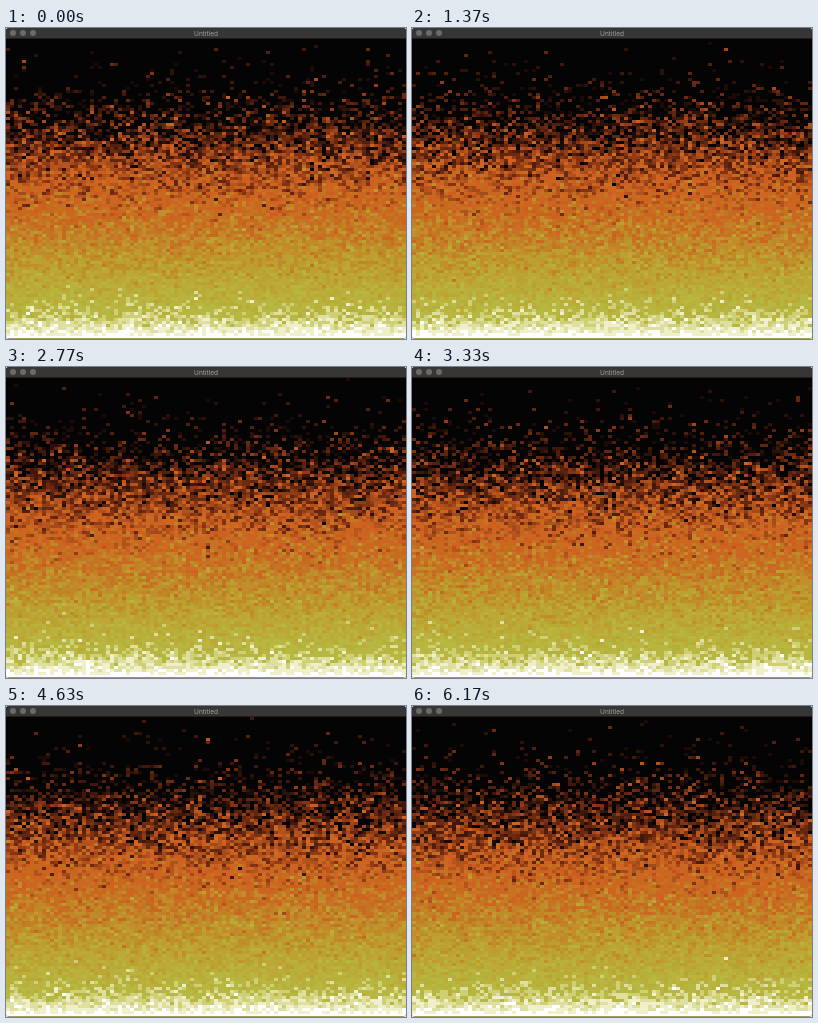
Write an HTML page with a canvas that moves like this. It is 400 px wide and 311 px high and loops after 7170 ms.

```html
<!DOCTYPE html>
<html lang="en">
<head>
<meta charset="utf-8">
<title>Untitled</title>
<style>
  html, body { margin: 0; width: 100%; height: 100%; overflow: hidden; background: #fff; }
  .window { position: relative; width: 400px; height: 311px; overflow: hidden; border-radius: 3px; background: #050404; }
  .bar { position: absolute; inset: 0 0 auto; height: 10px; background: #363636; border-bottom: 1px solid #2c1814;
         color: #a2a2a2; font: 6.5px/13px Inter, Roboto, sans-serif; text-align: center; }
  .bar i { position: absolute; top: 2px; width: 6px; height: 6px; border-radius: 50%; background: #6a6a68; }
  canvas { position: absolute; left: 0; top: 11px; width: 400px; height: 300px; image-rendering: pixelated; }
  .edge { position: absolute; left: 2px; right: 2px; bottom: 0; height: 1px; background: #a39a5c; }
</style>
</head>
<body>
<div class="window">
  <div class="bar"><i style="left:4px"></i><i style="left:14px"></i><i style="left:24px"></i>Untitled</div>
  <canvas width="100" height="100"></canvas>
  <div class="edge"></div>
</div>
<script>
const SIZE = 100, LOOP = 7170, LAST = 6170, STEP = 100 / 3, STEPS = 186, COOLING = 0.48;

const toLinear = v => (v / 255) ** 2.2;
const toByte = v => Math.round(255 * v ** (1 / 2.2));

// Classic fire colours, muted as on a wide-gamut screen.
const palette = (
  '050404 1f0707 2f0f07 470f07 571707 671f07 771f07 8f2707 9f2f07 af3f07 bf4707 c74707 ' +
  'df4f07 df5707 df5707 d75f07 d75f07 d7670f cf6f0f cf770f cf7f0f cf8717 c78717 c78f17 ' +
  'c7971f bf9f1f bf9f1f bfa727 bfa727 bfaf2f b7af2f b7b72f b7b737 cfcf6f dfdf9f efefc7 ffffff'
).split(' ').map(hex => {
  const n = parseInt(hex, 16);
  const [r, g, b] = [n >> 16, n >> 8 & 255, n & 255].map(toLinear);
  const red = toByte(0.82 * r + 0.18 * g);
  const green = toByte(0.05 * r + 0.95 * g);
  const blue = toByte(0.01 * r + 0.03 * g + 0.96 * b);
  return (255 << 24 | blue << 16 | green << 8 | red) >>> 0;
});
const HOT = palette.length - 1;

let seed = 20771;
function random() {
  seed = seed + 0x6D2B79F5 | 0;
  let n = Math.imul(seed ^ seed >>> 15, 1 | seed);
  n = n + Math.imul(n ^ n >>> 7, 61 | n) ^ n;
  return ((n ^ n >>> 14) >>> 0) / 4294967296;
}

// Each spark leaves the bottom row, rises one row per step and cools at random.
const sparks = new Uint8Array((STEPS + SIZE) * SIZE * SIZE);
for (let i = 0; i < sparks.length; i += SIZE) {
  let heat = HOT;
  for (let row = 0; row < SIZE; row++) {
    sparks[i + row] = heat;
    if (heat > 0 && random() < COOLING) heat--;
  }
}

const ctx = document.querySelector('canvas').getContext('2d');
const picture = ctx.createImageData(SIZE, SIZE);
const pixels = new Uint32Array(picture.data.buffer);
let shown = -1;

function draw(step) {
  for (let row = 0; row < SIZE; row++) {
    const birth = step + SIZE - row;
    for (let x = 0; x < SIZE; x++) {
      pixels[(SIZE - 1 - row) * SIZE + x] = palette[sparks[(birth * SIZE + x) * SIZE + row]];
    }
  }
  ctx.putImageData(picture, 0, 0);
}

function tick() {
  const time = Math.min(performance.now() % LOOP, LAST);
  // Steps fall on whole hundredths of a second.
  const step = Math.floor((Math.floor(time / 10) * 10 + 5) / STEP);
  if (step !== shown) draw(shown = step);
  requestAnimationFrame(tick);
}
tick();
</script>
</body>
</html>
```
